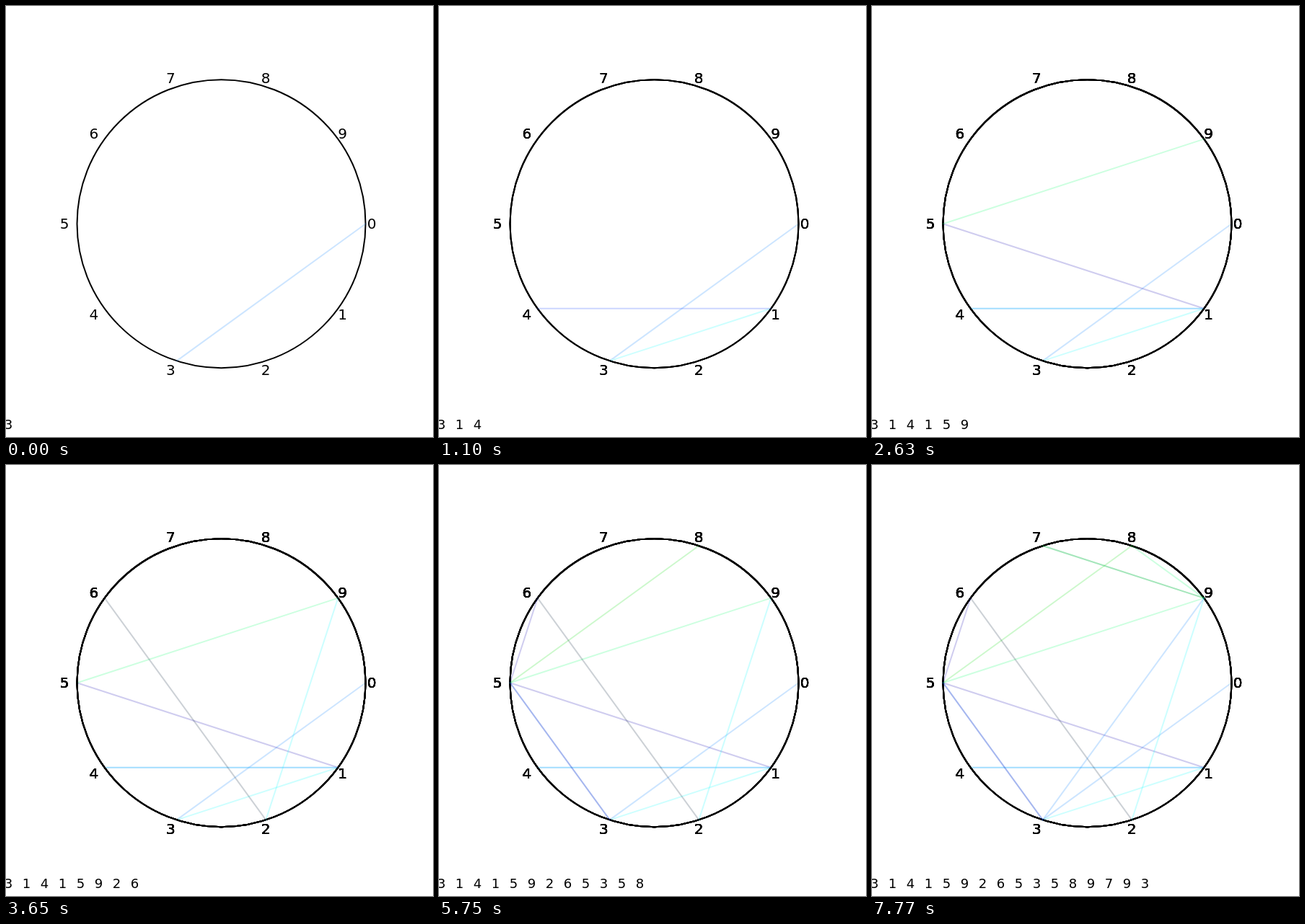
These frames come from a looping animation (592x598 px, 8000 ms). An HTML page with a canvas:

```html
<!DOCTYPE html>
<html lang="en">
<head>
<meta charset="utf-8">
<title>Digit chords</title>
<style>
  html, body { margin: 0; width: 100%; height: 100%; overflow: hidden; background: #fff; }
  canvas { display: block; }
</style>
</head>
<body>
<canvas id="stage" width="592" height="598"></canvas>
<script>
const ctx = document.getElementById('stage').getContext('2d');
const LOOP = 8000;
const DIGITS = [3, 1, 4, 1, 5, 9, 2, 6, 5, 3, 5, 8, 9, 7, 9, 3];
const STARTS = [0, 550, 1100, 1620, 2160, 2630, 3180, 3650,
                4190, 4730, 5200, 5750, 6210, 6760, 7220, 7770];
const CX = 298.5, CY = 302.2, RADIUS = 200;
const LABEL_X = 294.2, LABEL_RADIUS = 213;
const MAX_PASSES = 7;

// chord colour by the digit it leads to
const COLORS = ['0,191,255', '0,255,255', '0,250,255', '0,127,255', '0,51,255',
                '15,0,175', '0,25,50', '0,100,20', '0,220,0', '0,255,100'];

function point(digit, cx, r) {
  const a = digit * Math.PI / 5;
  return [cx + r * Math.cos(a), CY + r * Math.sin(a)];
}

function drawDigit(digit, x, y, size) {
  ctx.font = size + 'px "DejaVu Sans", sans-serif';
  ctx.fillText(digit, x, y + size * 0.3645);
}

function drawDial() {
  ctx.strokeStyle = '#000';
  ctx.beginPath();
  ctx.arc(CX, CY, RADIUS, 0, Math.PI * 2);
  ctx.stroke();
  for (let d = 0; d < 10; d++) drawDigit(d, ...point(d, LABEL_X, LABEL_RADIUS), 20);
}

function drawChord(from, to) {
  ctx.strokeStyle = `rgba(${COLORS[to]},0.2)`;
  ctx.beginPath();
  ctx.moveTo(...point(from, CX, RADIUS));
  ctx.lineTo(...point(to, CX, RADIUS));
  ctx.stroke();
}

function draw(step) {
  ctx.fillStyle = '#fff';
  ctx.fillRect(0, 0, 592, 598);
  ctx.fillStyle = '#000';
  ctx.textAlign = 'center';
  ctx.lineWidth = 2;
  ctx.lineCap = 'round';
  for (let i = 0; i <= step; i++) {
    // repeated passes darken the soft edges of the dial
    if (i < MAX_PASSES) drawDial();
    drawChord(i ? DIGITS[i - 1] : 0, DIGITS[i]);
    drawDigit(DIGITS[i], 3.6 + 25 * i, 580.5, 18);
  }
}

let shown = -1;
const begin = performance.now();

function tick() {
  const t = (performance.now() - begin) % LOOP;
  const step = STARTS.filter(s => s <= t).length - 1;
  if (step !== shown) draw(shown = step);
  requestAnimationFrame(tick);
}
tick();
</script>
</body>
</html>
```
